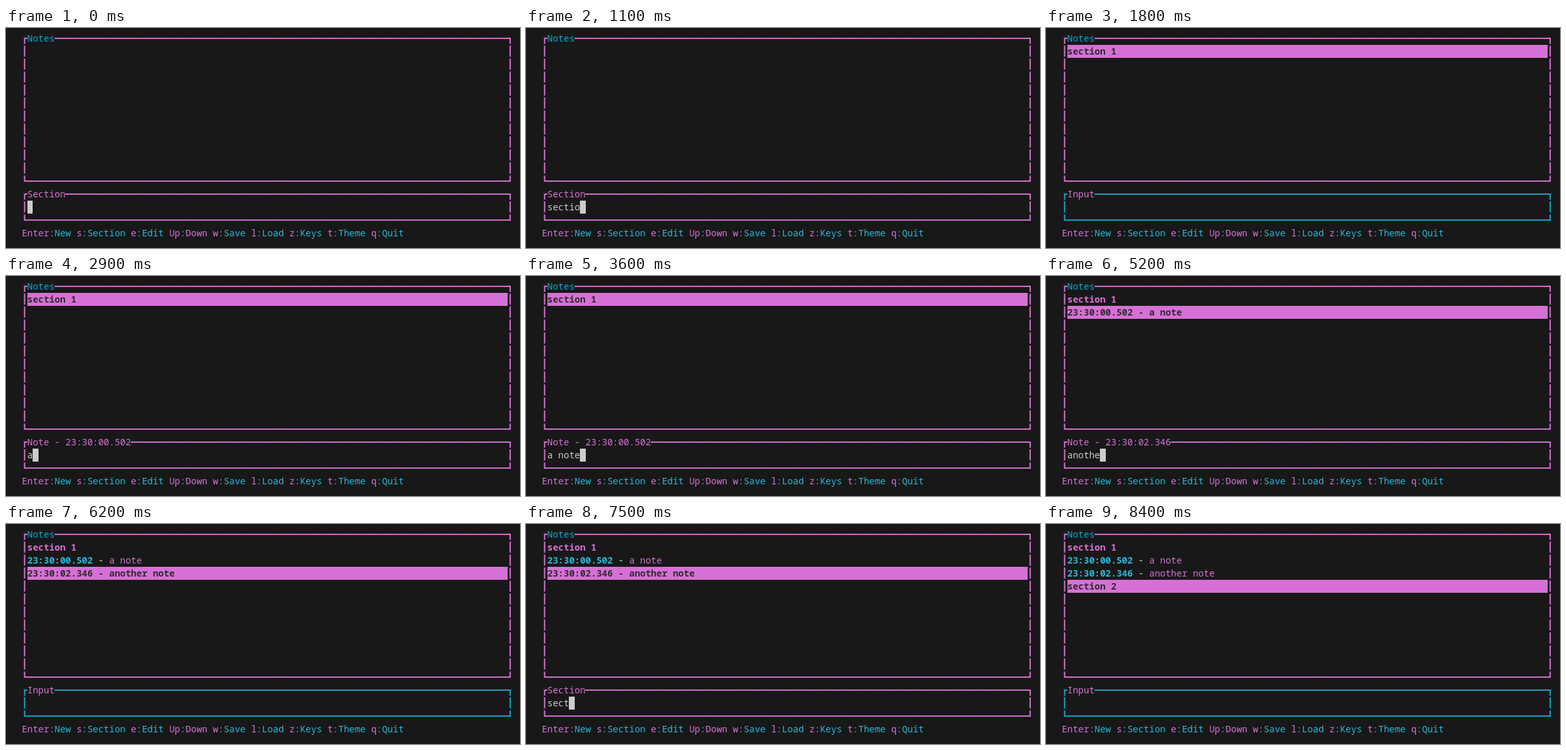
These frames come from a looping animation (791 by 339 pixels, 9.8 s). An HTML page with a canvas:

```html
<!DOCTYPE html>
<html lang="en">
<head>
<meta charset="utf-8">
<title>Terminal notes</title>
<style>
html, body { margin: 0; width: 100%; height: 100%; overflow: hidden; background: #181818; }
canvas { display: block; }
</style>
</head>
<body>
<canvas id="stage" width="791" height="339"></canvas>
<script>
const ctx = document.getElementById('stage').getContext('2d');
const LOOP = 9800, TICK = 100;
const CELL = 8.3986, ROW = 20, LEFT = 24.395, TOP = 6, COLS = 90;
const FONT = '14px "Noto Sans Mono", "DejaVu Sans Mono", monospace';
const BG = '#181818', FG = '#cccccc', DARK = '#2d2d2d';
const PINK = '#d670d6', CYAN = '#11a8cd', SKY = '#29b8db';

const colX = c => LEFT + c * CELL;
const rowY = r => TOP + r * ROW;

// Each burst of even typing: first key, last key, number of keys
const entries = [
  { text: 'section 1', open: 0, done: 1800, bursts: [[200, 600, 3], [900, 1500, 6]] },
  { text: 'a note', stamp: '23:30:00.502', open: 2500, done: 4000, bursts: [[2900, 3600, 6]] },
  { text: 'another note', stamp: '23:30:02.346', open: 4400, done: 6200, bursts: [[4700, 5900, 12]] },
  { text: 'section 2', open: 6700, done: 8400, bursts: [[6900, 7500, 4], [7600, 8200, 5]] }
];

const help = 'Enter:New s:Section e:Edit Up:Down w:Save l:Load z:Keys t:Theme q:Quit';

// Keys appear on whole ticks of the terminal's refresh
function typed(bursts, t) {
  let count = 0;
  for (const [first, last, keys] of bursts) {
    for (let i = 0; i < keys; i++) {
      const at = first + (last - first) * i / (keys - 1);
      if (t >= Math.floor(at / TICK) * TICK) count++;
    }
  }
  return count;
}

function write(str, col, row, color, bold) {
  ctx.font = (bold ? 'bold ' : '') + FONT;
  ctx.fillStyle = color;
  [...str].forEach((ch, i) => ctx.fillText(ch, colX(col + i), rowY(row) + 15));
}

function fillCells(col, row, count, color) {
  const x = Math.round(colX(col));
  ctx.fillStyle = color;
  ctx.fillRect(x, rowY(row), Math.round(colX(col + count)) - x, ROW);
}

function box(row, inner, color, title, titleColor) {
  const last = row + inner + 1;
  const rule = n => '━'.repeat(n);
  write('┏', 0, row, color);
  write(title, 1, row, titleColor);
  write(rule(COLS - 2 - title.length) + '┓', 1 + title.length, row, color);
  for (let r = row + 1; r < last; r++) {
    write('┃', 0, r, color);
    write('┃', COLS - 1, r, color);
  }
  write('┗' + rule(COLS - 2) + '┛', 0, last, color);
}

function listItem({ stamp, text }, row, selected) {
  if (selected) {
    fillCells(1, row, COLS - 2, PINK);
    write(stamp ? stamp + ' - ' + text : text, 1, row, DARK, true);
  } else if (stamp) {
    write(stamp, 1, row, SKY, true);
    write('-', 2 + stamp.length, row, FG);
    write(text, 4 + stamp.length, row, PINK);
  } else {
    write(text, 1, row, PINK, true);
  }
}

function inputBox(entry, t) {
  if (!entry) return box(12, 1, CYAN, 'Input', PINK);
  box(12, 1, PINK, entry.stamp ? 'Note - ' + entry.stamp : 'Section', PINK);
  const count = typed(entry.bursts, t);
  write(entry.text.slice(0, count), 1, 13, FG);
  fillCells(1 + count, 13, 1, FG);
}

function helpLine() {
  let col = 0;
  for (const word of help.split(' ')) {
    const [key, label] = word.split(':');
    write(key, col, 15, PINK);
    write(':', col + key.length, 15, SKY);
    // Up and Down are both keys
    write(label, col + key.length + 1, 15, label === 'Down' ? PINK : SKY);
    col += word.length + 1;
  }
}

function draw(t) {
  ctx.fillStyle = BG;
  ctx.fillRect(0, 0, 791, 339);
  box(0, 10, PINK, 'Notes', CYAN);
  const saved = entries.filter(e => t >= e.done);
  saved.forEach((e, i) => listItem(e, i + 1, i === saved.length - 1));
  inputBox(entries.find(e => t >= e.open && t < e.done), t);
  helpLine();
}

const start = performance.now();
function tick() {
  draw((performance.now() - start) % LOOP);
  requestAnimationFrame(tick);
}
tick();
</script>
</body>
</html>
```
